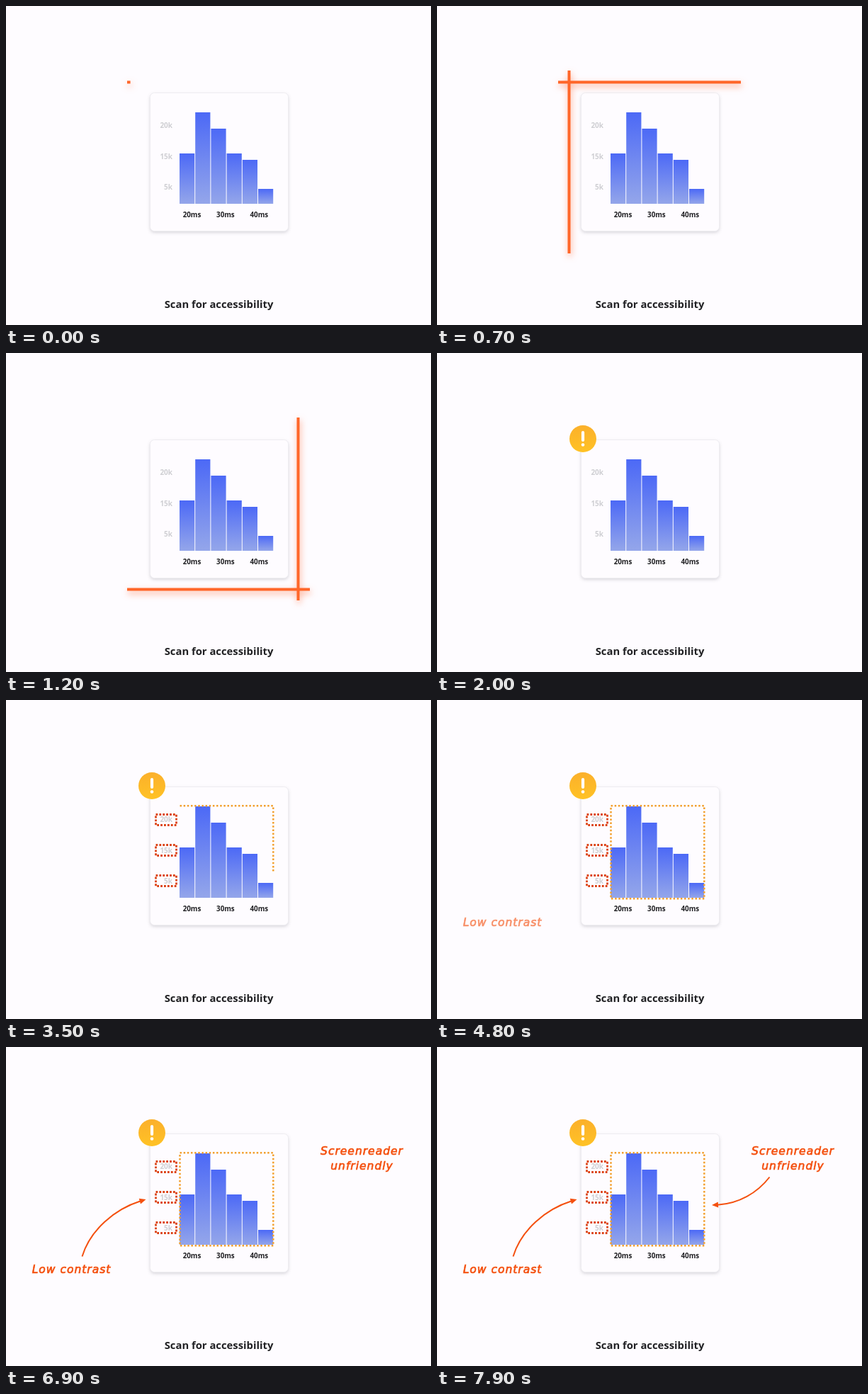
Recreate the animation shown at these times as an HTML page. Size 600x450 px, loop 8000 ms.

```html
<!DOCTYPE html>
<html lang="en">
<head>
<meta charset="utf-8">
<title>Scan for accessibility</title>
<style>
  html, body { margin: 0; width: 100%; height: 100%; overflow: hidden; background: #fefcff; }
  svg { display: block; width: 600px; height: 450px; }
  text { font-family: "Open Sans", "Noto Sans", sans-serif; font-weight: 700; fill: #212124; text-anchor: middle; }
  .title { font-size: 14.8px; }
  .tick { font-size: 9.8px; }
  .value { font-size: 10px; fill: #cfcfd3; text-anchor: end; }
  .note text { font: italic 400 15.5px "DejaVu Sans", sans-serif; letter-spacing: 1px; fill: #f4500f; stroke: #f4500f; stroke-width: .7; }
  .card { fill: #fefcff; stroke: #eeedf1; filter: drop-shadow(0 2px 2px rgba(40, 40, 60, .17)); }
  .beam { fill: #ff6629; filter: drop-shadow(1px 4px 5px rgba(255, 90, 30, .55)); }
  .curve { fill: none; stroke: #f4500f; stroke-width: 2; }
  .head { fill: #f4500f; }
  .frame { fill: none; }
</style>
</head>
<body>
<svg viewBox="0 0 600 450">
  <defs>
    <linearGradient id="blue" x2="0" y2="1">
      <stop offset="0" stop-color="#4c69f6"/>
      <stop offset="1" stop-color="#94a6ea"/>
    </linearGradient>
    <linearGradient id="amber" x2="0" y2="1">
      <stop offset="0" stop-color="#fbb02b"/>
      <stop offset="1" stop-color="#ffc225"/>
    </linearGradient>
  </defs>
  <rect class="card" x="203.5" y="122.5" width="195" height="195" rx="6"/>
  <g id="chart"></g>
  <g id="frames"></g>
  <g id="badge">
    <circle r="19" fill="url(#amber)"/>
    <path d="M0-9V2" stroke="#fff" stroke-width="4.2" stroke-linecap="round"/>
    <circle cy="8.5" r="2.3" fill="#fff"/>
  </g>
  <g class="note" id="contrast">
    <text x="92.5" y="318.5">Low contrast</text>
  </g>
  <g class="note" id="reader">
    <text x="502.5" y="151.5">Screenreader</text>
    <text x="502.5" y="172.5">unfriendly</text>
  </g>
  <g id="arrows"></g>
  <g class="beam">
    <rect id="beamX" height="4"/>
    <rect id="beamY" width="4"/>
  </g>
  <text class="title" x="300.5" y="426">Scan for accessibility</text>
</svg>
<script>
const LOOP = 8000;
const BEAM = { length: 258, travel: 226 };
const $ = id => document.getElementById(id);

function set(node, attrs) {
  for (const key in attrs) node.setAttribute(key, attrs[key]);
}

function add(parent, tag, attrs, text = "") {
  const node = document.createElementNS("http://www.w3.org/2000/svg", tag);
  set(node, attrs);
  node.textContent = text;
  return parent.appendChild(node);
}

const span = (t, start, duration) => Math.min(1, Math.max(0, (t - start) / duration));
const sine = p => (1 - Math.cos(Math.PI * p)) / 2;
const cubicInOut = p => p < .5 ? 4 * p ** 3 : 1 - 4 * (1 - p) ** 3;
const cubicOut = p => 1 - (1 - p) ** 3;

// Chart
[208, 150, 173, 208, 217, 258].forEach((top, i) => add($("chart"), "rect", {
  x: 245 + i * 22.2, y: top, width: 21.2, height: 279 - top, fill: "url(#blue)"
}));
["20k", "15k", "5k"].forEach((label, i) =>
  add($("chart"), "text", { class: "value", x: 235, y: 172.3 + i * 43.2 }, label));
["20ms", "30ms", "40ms"].forEach((label, i) =>
  add($("chart"), "text", { class: "tick", x: 262.5 + i * 47.4, y: 297.5 }, label));

// Dotted frames, drawn clockwise from the top left corner
function dottedFrame(x, y, w, h, color, dot, dots, start, duration) {
  const step = 2 * (w + h) / dots;
  const node = add($("frames"), "path", {
    class: "frame", d: `M${x} ${y}h${w}v${h}h${-w}z`, stroke: color, "stroke-width": dot
  });
  return t => {
    const count = Math.round(dots * sine(span(t, start, duration)));
    set(node, {
      visibility: count ? "visible" : "hidden",
      "stroke-dasharray": `${dot} ${step - dot} `.repeat(count) + "0 999"
    });
  };
}

const frames = [0, 1, 2].map(i =>
  dottedFrame(211.5, 161.5 + i * 43, 29, 15, "#dc4316", 2.8, 18, 2100 + i * 150, 700));
frames.push(dottedFrame(245.5, 149.3, 131.8, 131, "#f2a02e", 2.5, 102, 3000, 1100));

// Arrows: the curve is traced first, then the head grows at its end
function arrow(curve, x, y, angle, start) {
  const line = add($("arrows"), "path", { class: "curve", d: curve, pathLength: 1 });
  const head = add($("arrows"), "path", { class: "head", d: "M0 0L-9-4V4Z" });
  return t => {
    const p = sine(span(t, start, 600));
    const size = span(t, start + 480, 120);
    set(line, { "stroke-dasharray": `${p} 2`, visibility: p ? "visible" : "hidden" });
    set(head, { transform: `translate(${x} ${y}) rotate(${angle}) scale(${size})` });
  };
}

const arrows = [
  arrow("M107.5 295.5C119 258 153 229 190 217.3", 197.5, 215, -17, 5050),
  arrow("M469.5 183.5C452 206 426 221 396 222.7", 388, 223, 177, 6950)
];

function drawBeams(t) {
  const shift = BEAM.travel * cubicInOut(span(t, 700, 500));
  const trim = delay => {
    const from = sine(span(t, 1300 + delay, 400));
    const to = sine(span(t, -50 + delay, 600));
    return [BEAM.length * from, BEAM.length * (to - from)];
  };
  const [x, width] = trim(0);
  const [y, height] = trim(100);
  set($("beamX"), { x: 171 + x, y: 105.5 + shift, width });
  set($("beamY"), { x: 184.5 + shift, y: 91 + y, height });
}

function render(t) {
  drawBeams(t);
  const pop = cubicOut(span(t, 1750, 250));
  set($("badge"), { transform: `translate(206 121) scale(${pop})` });
  frames.forEach(draw => draw(t));
  arrows.forEach(draw => draw(t));
  set($("contrast"), { opacity: span(t, 4550, 400) });
  set($("reader"), { opacity: span(t, 6450, 400) });
}

const origin = performance.now();

function tick() {
  render((performance.now() - origin) % LOOP);
  requestAnimationFrame(tick);
}

tick();
</script>
</body>
</html>
```
